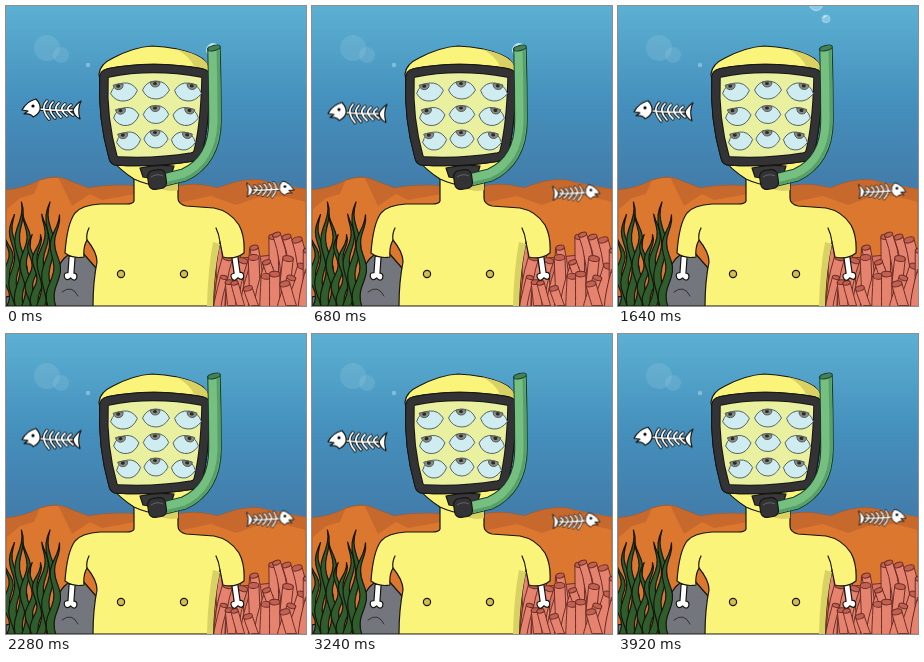
An HTML page that plays this animation: 300x300 px, repeating every 3960 ms.

```html
<!DOCTYPE html>
<html lang="en">
<head>
<meta charset="utf-8">
<title>Underwater</title>
<style>
html, body { margin: 0; width: 100%; height: 100%; overflow: hidden; background: #4590bd; }
svg { display: block; width: 100vw; height: 100vh; }
.ink { stroke: #17150f; stroke-width: 1.2; stroke-linejoin: round; stroke-linecap: round; }
.line { fill: none; }
.bob { animation: bob 990ms linear infinite alternate; }
.bubble { animation: 3960ms linear infinite; }
.big { animation-name: big; }
.small { animation-name: small; }
@keyframes bob { to { transform: translateY(5px); } }
@keyframes big {
  0%, 18.2% { transform: translate(207px, 44px); }
  30.3% { transform: translate(204px, 20px); }
  45.5%, 100% { transform: translate(196px, -10px); }
}
@keyframes small {
  0%, 27.3% { transform: translate(206px, 46px); }
  30.3% { transform: translate(204px, 39px); }
  41.4% { transform: translate(208px, 13px); }
  50%, 100% { transform: translate(207px, -7px); }
}
</style>
</head>
<body>
<svg viewBox="0 0 300 300" preserveAspectRatio="none">
  <defs>
    <linearGradient id="sea" x2="0" y2="1">
      <stop offset="0" stop-color="#5cb0d2"/>
      <stop offset=".5" stop-color="#4590bd"/>
      <stop offset="1" stop-color="#427aa8"/>
    </linearGradient>
    <g id="fish">
      <g id="ribs" fill="none" stroke-linecap="round"></g>
      <path class="ink" fill="#fff" d="M67 104Q70 98 75 95Q71 103 74 113Q68 110 67 104Z"/>
      <path class="ink" fill="#fff" d="M16 104Q21 95 30 93Q35 98 34 104Q32 109 27 111Q25 107 18 108L22 105Z"/>
      <circle cx="27" cy="100" r="1.6"/>
    </g>
    <path id="bone" class="ink" fill="#fff" d="M-3 -2V15Q-8 15 -6 20Q-4 24 0 20Q4 24 6 20Q7 15 3 15V-2Z"/>
    <g id="orb">
      <circle r="6.500" fill="#a9d7ee" fill-opacity=".6" stroke="#c3e6f3" stroke-width=".9"/>
      <path d="M-4-2Q-3-5 0-5" fill="none" stroke="#fff" stroke-width="1.5" stroke-linecap="round"/>
    </g>
  </defs>

  <rect width="300" height="190" fill="url(#sea)"/>
  <g fill="#a5d3e8">
    <circle cx="41" cy="42" r="13" opacity=".2"/>
    <circle cx="55" cy="49" r="8" opacity=".2"/>
    <circle cx="82" cy="59" r="2.200" opacity=".6"/>
  </g>

  <path d="M0 184Q20 182 34 174Q51 168 64 175L82 182Q104 178 130 180H172Q190 176 212 182Q236 172 254 174Q282 182 300 183V300H0Z" fill="#dc7730" stroke="#a9541f" stroke-width=".8"/>
  <g fill="#c3662d" opacity=".8">
    <path d="M0 184Q20 182 34 174L28 188L14 192L0 204Z"/>
    <path d="M52 171L82 182Q104 178 130 180V188L96 194L84 188L66 200Z"/>
    <path d="M172 180Q190 176 212 182Q236 172 254 174L300 183V196L276 190L250 192L230 199L205 190L172 197Z"/>
  </g>

  <g class="ink" fill="#74767e">
    <path d="M0 291Q8 288 14 300H0Z"/>
    <path d="M46 300L52 262Q60 244 76 246L90 262V300Z"/>
    <path d="M56 286Q66 278 72 290" class="line" stroke-width=".7"/>
  </g>
  <g id="weed" class="ink" fill="#2f5d2b"></g>
  <g id="coral" class="ink" fill="#e5836f" style="stroke:#6b2f28;stroke-width:1"></g>

  <use href="#bone" transform="translate(66 252) rotate(4)"/>
  <use href="#bone" transform="translate(229 252) rotate(-8)"/>
  <g class="ink" fill="#fbf47a">
    <path d="M128 166V195Q127 198 120 198H94Q76 199 69 207Q61 218 59 247Q67 253 78 251Q77 241 81 234Q91 246 91 256Q87 276 87 300H207Q208 264 214 236L217 251Q229 254 238 247Q239 230 233 219Q224 205 208 202L180 200Q172 198 172 192V166Z"/>
    <path d="M81 234Q80 228 83 222M214 236Q213 228 210 222" class="line"/>
    <path d="M93 68Q94 58 107 52Q128 41 146 40Q172 41 190 49Q202 54 204 66L194 152Q184 172 168 178Q146 182 128 173Q114 164 106 154Z"/>
  </g>
  <path d="M170 43Q204 50 203 65L189 62Q184 50 170 43ZM150 180Q165 178 172 172V184Q160 187 150 180ZM214 238Q208 264 207 300H201Q202 262 207 236Z" fill="#d9d163"/>
  <g class="ink" fill="#d4bd50">
    <circle cx="115" cy="268" r="3.600"/>
    <circle cx="178" cy="268" r="3.600"/>
  </g>

  <path id="rim" d="M98 72Q98 68 102 67Q146 58 196 67Q200 68 200 72Q199 118 192 146Q191 150 186 151Q150 157 112 155Q108 155 107 151Q96 112 98 72Z" fill="#e9f09f" stroke="#17150f" stroke-width="9.500"/>
  <use href="#rim" style="fill:none"/>
  <path d="M98 72Q98 68 102 67Q146 58 196 67Q200 68 200 72Q199 118 192 146Q191 150 186 151Q150 157 112 155Q108 155 107 151Q96 112 98 72Z" fill="none" stroke="#333335" stroke-width="7.500"/>
  <g id="eyes"></g>

  <g class="bubble small"><use href="#orb" transform="scale(.6)"/></g>
  <g class="bubble big"><use href="#orb"/></g>

  <g class="ink" fill="#38383a">
    <path d="M134 162Q150 158 168 160L165 170Q150 174 137 171Z"/>
  </g>
  <g fill="none">
    <path d="M208 42Q209 80 209 115C209 141 198 160 178 169L158 174" stroke="#173b26" stroke-width="13.500"/>
    <path d="M208 42Q209 80 209 115C209 141 198 160 178 169L158 174" stroke="#75c080" stroke-width="11.500"/>
    <path d="M212 44Q213 80 213 116C212 144 200 164 179 173L159 178" stroke="#57a068" stroke-width="3"/>
  </g>
  <ellipse cx="208" cy="42" rx="6.500" ry="2.600" fill="#438257" stroke="#173b26" transform="rotate(-14 208 42)"/>
  <rect x="142" y="164" width="18" height="19" rx="6" class="ink" fill="#333335" transform="rotate(-8 151 173)"/>
  <path d="M145 171Q151 167 157 170" fill="none" stroke="#626266"/>

  <g class="bob"><use href="#fish"/></g>
  <g class="bob"><use href="#fish" transform="translate(300.500 100.600) scale(-.8 .8)"/></g>
</svg>
<script>
const $ = id => document.getElementById(id);
const make = (n, draw) => Array.from({ length: n }, (_, i) => draw(i)).join('');

let seed = 11;
const rand = (lo, hi) => {
  seed = seed * 16807 % 2147483647;
  return lo + (hi - lo) * seed / 2147483647;
};

// Spine and swept ribs, drawn dark and then white on top
const bones = 'M33 103Q52 105 68 104' + make(5, i => {
  const x = 38 + i * 6, h = 9 - i;
  return `M${x + 3} ${104 - h}Q${x - 1} ${104 - h / 2} ${x} 104Q${x + 1} ${104 + h / 2} ${x + 5} ${104 + h}`;
});
$('ribs').innerHTML = `<path d="${bones}" stroke="#17150f" stroke-width="3.4"/><path d="${bones}" stroke="#fff" stroke-width="1.7"/>`;

// Wavy tapering blades
$('weed').innerHTML = make(9, i => {
  const top = 214 - 18 * Math.cos((i - 2) * 1.26), steps = 16;
  const side = s => Array.from({ length: steps + 1 }, (_, k) => {
    const u = k / steps;
    const x = 5 + i * 5.2 + (i - 4) * u + 3 * Math.sin(u * 11 + i * 2) + s * 4 * (1 - u ** 2);
    return `${x.toFixed(1)} ${(300 - u * (300 - top)).toFixed(1)}`;
  });
  return `<path d="M${side(-1).concat(side(1).reverse()).join('L')}Z"/>`;
});

// Rows of leaning tubes, tallest at the back
$('coral').innerHTML = '<path d="M208 300L211 268L236 252L300 246V300Z" fill="#d9735f"/>' + make(27, i => {
  const row = Math.floor(i / 9), r = rand(3.6, 5.4);
  const x = 215 + i % 9 * 10.5 + rand(-4, 4);
  const tip = x + rand(-10, 10);
  const y = 242 + row * 18 - (x - 215) * .12 + rand(-9, 9);
  return `<path d="M${x - r} 300Q${x - r} ${y + 25} ${tip - r} ${y}H${tip + r}Q${x + r} ${y + 25} ${x + r} 300Z"/>` +
    `<ellipse cx="${tip}" cy="${y}" rx="${r}" ry="${r * .55}" fill="#c4604f" transform="rotate(${(tip - x) * 2} ${tip} ${y})"/>`;
});

// Three rows of eyes that narrow downwards
$('eyes').innerHTML = make(9, i => {
  const row = Math.floor(i / 3), col = i % 3 - 1;
  const x = 150 + col * (32 - row * 2.3), y = 84 + row * 24.5 + 2 * Math.abs(col);
  const w = 13.5 - row * .7, px = col * 4 - 1;
  return `<g transform="translate(${x} ${y}) rotate(${col * 7})" stroke="#4d5a5c" stroke-width=".9">
    <path fill="#cfedf0" d="M${-w} 0Q${-w * .7} -9 0 -9Q${w * .7} -9 ${w} 0Q${w * .6} 9 0 9Q${-w * .7} 9 ${-w} 0Z"/>
    <path fill="#8e8c80" d="M${px - 5} -8Q${px - 4} -3 ${px} -3Q${px + 5} -3 ${px + 5} -8Q${px} -9.500 ${px - 5} -8Z"/>
    <ellipse cx="${px}" cy="-6.500" rx="2" ry="1.600" fill="#2b2a28" stroke="none"/>
  </g>`;
});
</script>
</body>
</html>
```
